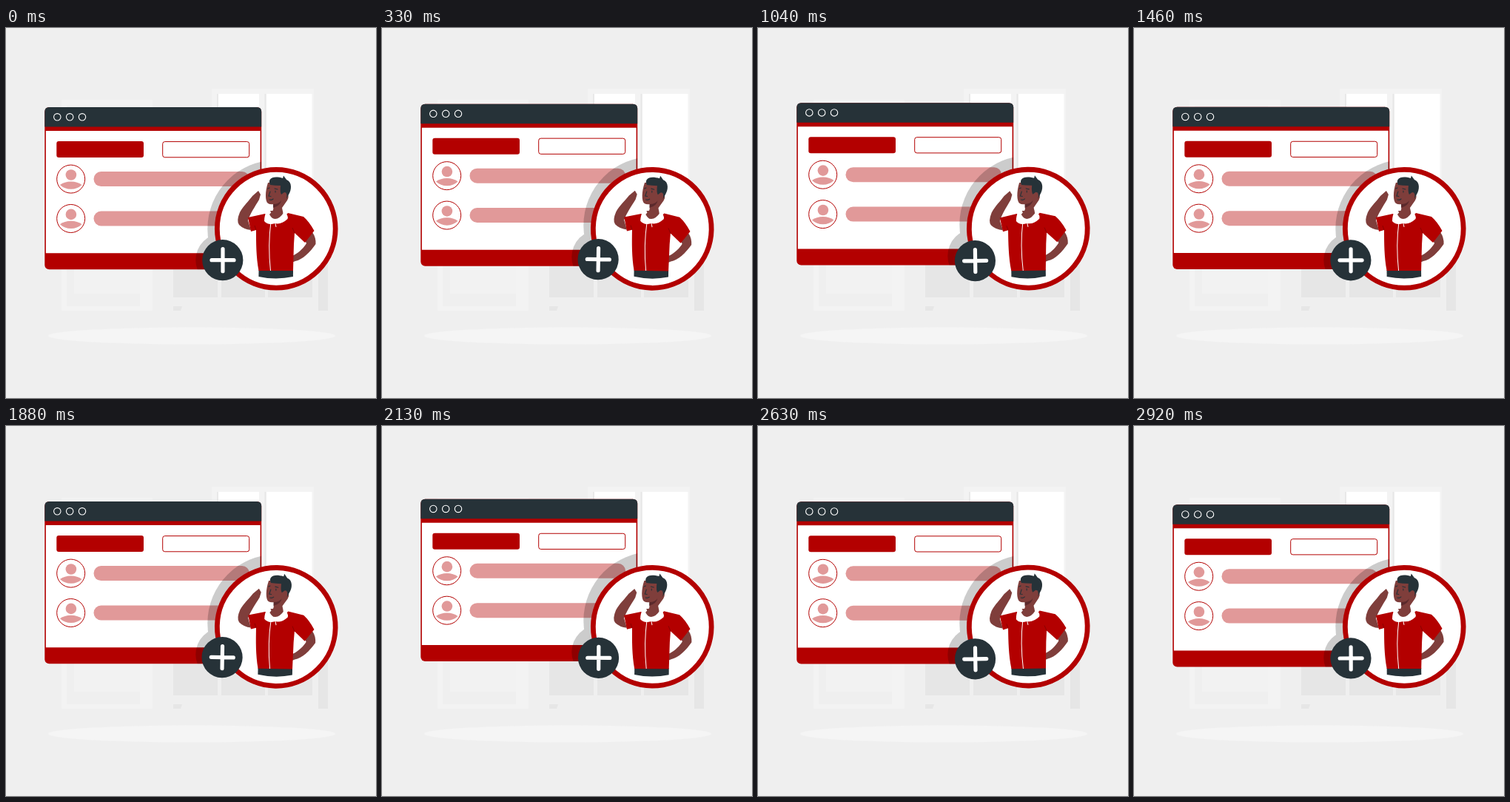
An HTML page that plays this animation: 500x500 px, repeating every 2.96 s.

```html
<!DOCTYPE html>
<html lang="en">
<head>
<meta charset="utf-8">
<title>Add member</title>
<style>
  html, body { margin: 0; width: 100%; height: 100%; overflow: hidden; background: #efefef; }
  svg { display: block; width: 100vw; height: 100vh; }
</style>
</head>
<body>
<svg viewBox="0 0 500 500">
  <defs>
    <clipPath id="panelClip"><rect x="52.3" y="107" width="292.9" height="219.2" rx="6"/></clipPath>
    <g id="row">
      <circle cx="87.7" cy="204" r="19" fill="#fff" stroke="#b30000"/>
      <g fill="#e19999">
        <circle cx="87.9" cy="198.4" r="7.3"/>
        <path d="M73 211.8Q79 207.3 87.8 207.3T102.5 211.8Q96.500 217.600 87.800 217.600T73 211.800Z"/>
        <rect x="118.500" y="194" width="210.500" height="20" rx="10"/>
      </g>
    </g>
  </defs>

  <g id="room">
    <ellipse cx="251" cy="416" rx="194" ry="11.5" fill="#f5f5f5"/>
    <path fill="#f3f3f3" d="M75 97H198V382H75Z"/>
    <path fill="#efefef" d="M82 105H191V376H82Z"/>
    <path fill="#f3f3f3" d="M181 105H191V376H181Z"/>
    <path fill="#f2f2f2" d="M92 112H181V359H92Z"/>
    <path fill="#e6e6e6" d="M422 300H435V382H422ZM226 376H238L236 382H226Z"/>
    <path fill="#f3f3f3" d="M278 82H416V376H278Z"/>
    <path fill="#efefef" d="M226 300H422V376H226Z"/>
    <path fill="#e6e6e6" d="M226 300H286V364H226ZM291 300H350V364H291ZM354 300H414V364H354Z"/>
    <path fill="#fff" d="M287 89H342V300H287ZM352 89H413.500V300H352Z"/>
    <path fill="#e8e8e8" d="M285 89H287V300H285ZM349.500 89H351.500V300H349.500Z"/>
  </g>

  <g id="panel">
    <rect x="52.3" y="107" width="292.9" height="219.2" rx="6" fill="#b30000"/>
    <path fill="#263238" d="M52.300 133.500V113Q52.300 107 58.300 107H339.200Q345.200 107 345.200 113V133.500Z"/>
    <path fill="#fff" d="M53.900 139H343.600V304.200H53.900Z"/>
    <g fill="none" stroke="#fff" stroke-width="1.1">
      <circle cx="69.300" cy="120.200" r="4.700"/>
      <circle cx="86.200" cy="120.200" r="4.700"/>
      <circle cx="103" cy="120.200" r="4.700"/>
    </g>
    <rect x="68.300" y="153" width="117.700" height="22" rx="3" fill="#b30000"/>
    <rect x="211.700" y="153.500" width="117" height="21.200" rx="3" fill="#fff" stroke="#b30000"/>
    <use href="#row"/>
    <use href="#row" y="53.400"/>
    <g clip-path="url(#panelClip)">
      <g opacity=".2">
        <circle cx="365.300" cy="271.300" r="93"/>
        <circle cx="292.800" cy="313.700" r="36.500"/>
      </g>
    </g>
  </g>

  <g id="badge">
    <circle cx="365.250" cy="271.250" r="79.900" fill="#fff" stroke="#b30000" stroke-width="6.800"/>
    <g id="person">
      <g fill="#7f3e3b">
        <path d="M341 220L344 225L342 232C336 242 330 251 327 260L331 273Q321 272 315 266Q311 261 316 249C321 240 328 234 333 227Z"/>
        <path d="M404 287L414 276Q419 283 418.500 292C411 303 401 313 391 315L381 319L376 316L379 309L389 307C397 303 403 296 406 291Z"/>
        <path d="M354 209C350 221 350 234 354 237Q357 239 362 238L361 246L356 252Q364 266 375 253L373 243L380 233Q384 226 378 222L372 208Z"/>
      </g>
      <path fill="#263238" d="M357 212C353 204 360 199 374 203L375 199.500L379 205C387 208 386 219 382 225L379 231Q381 222 376 222L372 225Q370 222 371 213Q363 213 357 212Z"/>
      <path fill="none" stroke="#263238" stroke-width="1.100" stroke-linecap="round" d="M354 217l2-1M363 217l4 1M357 221l-2 6 3 .5M364 220v2M356 232q3 1 5-1"/>
      <path fill="#5b2a2c" d="M361 238Q369 238 372 233Q371 240 361 243Z"/>
      <path fill="#263238" d="M341.500 327H388V336Q365 341 341.500 336Z"/>
      <path fill="#b30000" d="M327 256L350 251Q365 269 381 250L402 255Q410 262 416.500 274L404 290L390 277L389 292L388 328H341.500C338 309 338 291 338 273L331 275Z"/>
      <path fill="#fff" d="M352 249.500Q364 267 376 248.500Q382 253 380.500 258Q372 266 363.500 264Q354 267 349 261Q349 253 352 249.500Z"/>
      <path fill="#7f3e3b" d="M357 247Q364 264 374 247Z"/>
      <path fill="none" stroke="#fff" d="M358 262C355 284 355 305 357.500 328M363 260l2 9"/>
      <path fill="none" stroke="#7a0000" stroke-width=".700" d="M390 277L387 270M338 273L336 267"/>
    </g>
    <circle cx="292.800" cy="313.700" r="27.600" fill="#263238"/>
    <path fill="none" stroke="#fff" stroke-width="5.200" stroke-linecap="round" d="M278 313.700H308M293 298.700V328.700"/>
  </g>
</svg>
<script>
  const LOOP = 2960, PERIOD = 1500, FPS = 24;
  const panel = document.getElementById('panel');
  const badge = document.getElementById('badge');

  // Triangle wave: 0 at phase 0, 1 at phase .5, 0 at phase 1
  const triangle = phase => 1 - Math.abs(1 - 2 * (phase - Math.floor(phase)));

  function draw(time) {
    const step = Math.floor((time % LOOP + 8) * FPS / 1000);
    const phase = (step * 1000 / FPS + 8) / PERIOD;
    const lift = 10 * triangle(phase);
    const sway = 2 * triangle(phase + .25) - 1;
    panel.setAttribute('transform', `translate(0 ${(.2 - lift).toFixed(3)})`);
    badge.setAttribute('transform', `rotate(${sway.toFixed(3)} 357 271)`);
  }

  const start = performance.now();
  function tick() {
    draw(performance.now() - start);
    requestAnimationFrame(tick);
  }
  tick();
</script>
</body>
</html>
```
